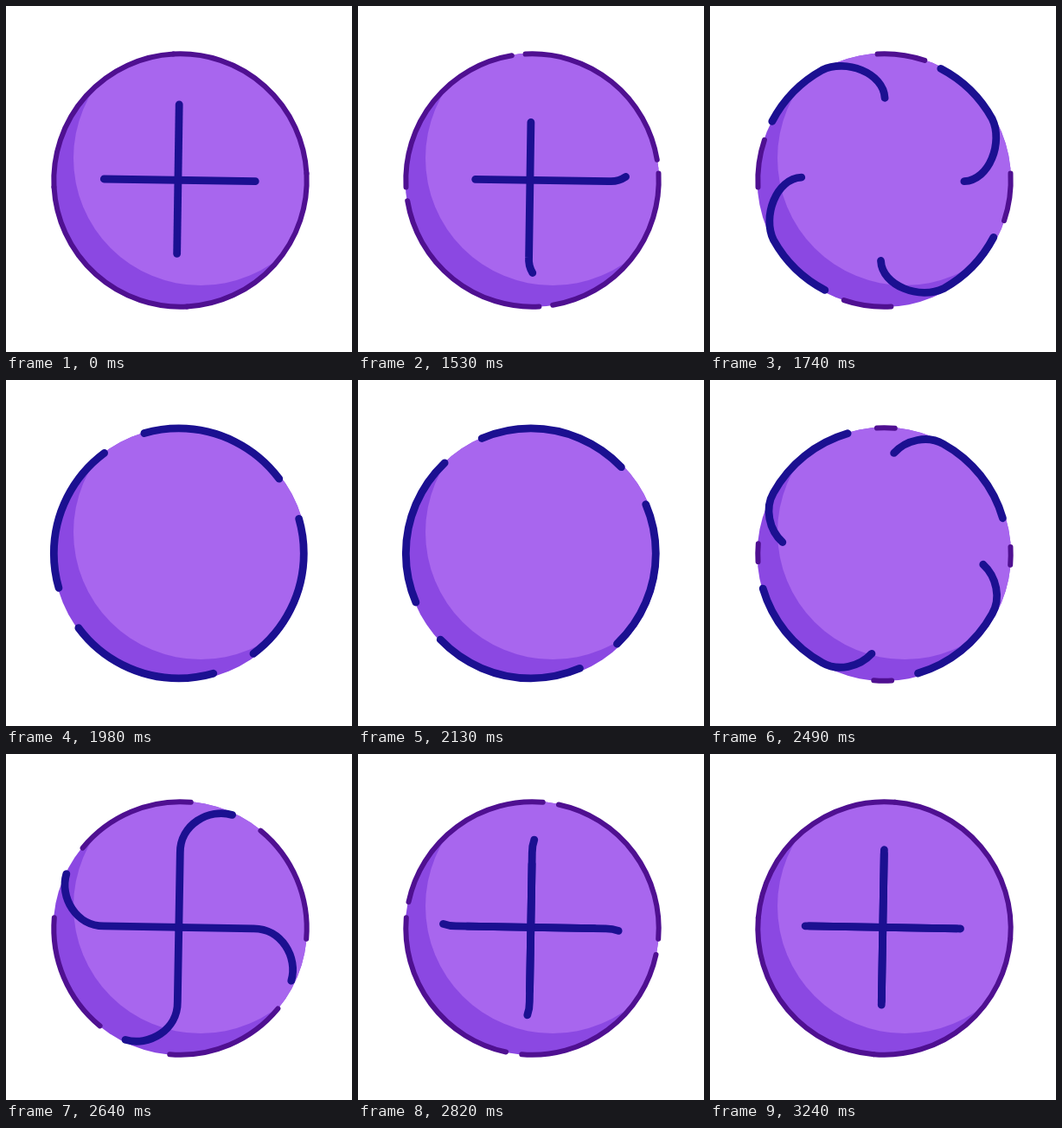
An HTML page that plays this animation: 400 px wide and 400 px high, repeating every 3.39 s.

```html
<!DOCTYPE html>
<html lang="en">
<head>
<meta charset="utf-8">
<title>Plus button</title>
<style>
  /* Distance travelled by the strokes, and length of each returning rim part. */
  @property --s {
    syntax: "<length>";
    inherits: true;
    initial-value: 0px;
  }

  @property --rim {
    syntax: "<length>";
    inherits: true;
    initial-value: -122px;
  }

  html, body {
    margin: 0;
    width: 100%;
    height: 100%;
    overflow: hidden;
    background: #fff;
  }

  svg {
    display: block;
    width: 100%;
    height: 100%;
    animation: travel 3390ms infinite;
  }

  path {
    fill: none;
    stroke-linecap: round;
  }

  .line {
    stroke: #1b1091;
    stroke-width: 8.8;
    stroke-dasharray: 175px 2000px;
    stroke-dashoffset: calc(var(--lag, 0px) - var(--s));
  }

  .down { --lag: max(0px, 2.5px - var(--s) / 40); }

  .late { animation: appear 3390ms step-end infinite; }

  .ring {
    stroke: #4f1091;
    stroke-width: 6;
    stroke-dasharray: 300px 2000px;
  }

  /* The dash slides off its start, or back in from it. */
  .out { stroke-dashoffset: calc(300px - (236px - var(--s))); }
  .in { stroke-dashoffset: calc(300px - var(--rim)); }

  @keyframes travel {
    0% { --s: 0px; --rim: -122px; animation-timing-function: step-end; }
    45.13% { --s: 21.5px; --rim: -122px; animation-timing-function: cubic-bezier(.333, .446, .667, .888); }
    58.407% { --s: 290.5px; --rim: -122px; animation-timing-function: cubic-bezier(.333, .545, .667, .455); }
    66.372% { --s: 323.5px; --rim: -122px; animation-timing-function: cubic-bezier(.333, .113, .667, .493); }
    73.451% { --s: 465.5px; --rim: 20px; animation-timing-function: cubic-bezier(.333, .514, .667, .971); }
    83.186% { --s: 658.5px; --rim: 211px; animation-timing-function: cubic-bezier(.333, .61, .667, 1); }
    95.575%, 100% { --s: 670.5px; --rim: 230px; }
  }

  @keyframes appear {
    0% { visibility: hidden; }
    45.9%, 100% { visibility: visible; }
  }
</style>
</head>
<body>
<svg viewBox="0 0 400 400">
  <defs>
    <clipPath id="disc"><circle cx="201.3" cy="201.3" r="146.7"/></clipPath>
    <!-- line, curl outwards, rim, curl inwards, line -->
    <path id="line" class="line" d="M-86.5 -.4 L90 2.2 C122 5 140 -42 126.4 -70
      A144.5 144.5 0 0 0 -126.4 -70 C-142 -43 -122.5 -1 -86 -1.5 L88 1.5"/>
    <path id="out" class="ring out" d="M146.2 0 A146.2 146.2 0 0 1 0 146.2"/>
    <path id="in" class="ring in" d="M146.2 0 A146.2 146.2 0 0 0 0 -146.2"/>
  </defs>

  <circle cx="201.3" cy="201.3" r="146.7" fill="#8b48e2"/>
  <circle cx="225" cy="176" r="147" fill="#a866ee" clip-path="url(#disc)"/>

  <g transform="translate(201.5 201.5) rotate(-93.1)">
    <use href="#out"/>
    <use href="#out" transform="rotate(90)"/>
    <use href="#out" transform="rotate(180)"/>
    <use href="#out" transform="rotate(270)"/>
  </g>
  <g transform="translate(201.5 201.5) rotate(-85.2)">
    <use href="#in"/>
    <use href="#in" transform="rotate(90)"/>
    <use href="#in" transform="rotate(180)"/>
    <use href="#in" transform="rotate(270)"/>
  </g>
  <g transform="translate(199.8 200.4)">
    <use href="#line"/>
    <use href="#line" class="down" transform="rotate(90)"/>
    <use href="#line" class="late" transform="rotate(180)"/>
    <use href="#line" class="late" transform="rotate(270)"/>
  </g>
</svg>
</body>
</html>
```
